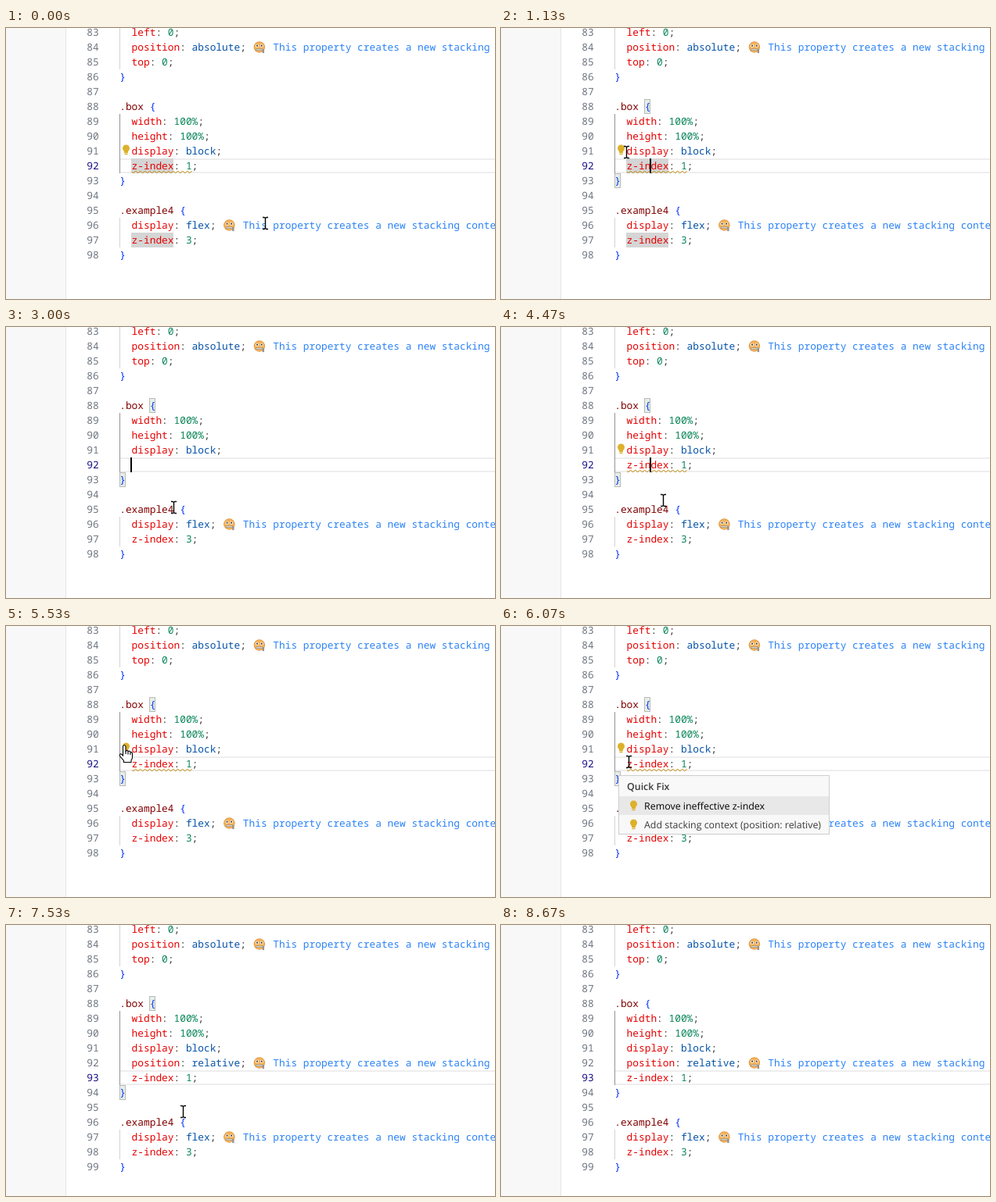
An HTML page with a canvas for the animation above (9140 ms loop, 625 by 347 pixels).

```html
<!DOCTYPE html>
<html lang="en">
<head>
<meta charset="utf-8">
<title>Quick fix in a code editor</title>
<style>
  html, body { margin: 0; width: 100%; height: 100%; overflow: hidden; background: #fff; }
  canvas { display: block; }
</style>
</head>
<body>
<canvas id="stage" width="625" height="347"></canvas>
<script>
const ctx = document.getElementById('stage').getContext('2d');
ctx.textRendering = 'geometricPrecision';

const LOOP = 9140, STEP = 200 / 3;
const LEFT = 145.2, CHAR = 7.698, LINE = 19, FIRST = 83;
const CODE_FONT = '12.83px "Noto Sans Mono", monospace';
const MENU_FONT = '12.41px "Open Sans", sans-serif';
const NOTE = 'This property creates a new stacking context';
const BRACE = '#0431fa';

const col = c => LEFT + c * CHAR;
const lineTop = n => (n - FIRST) * LINE - 4;
const within = (t, from, to) => t >= from && t < to;

function rect(x, y, w, h, color) {
  ctx.fillStyle = color;
  ctx.fillRect(x, y, w, h);
}

function text(str, x, y, color, font = CODE_FONT) {
  ctx.font = font;
  ctx.fillStyle = color;
  ctx.fillText(str, x, y);
}

function disc(x, y, r, color) {
  ctx.fillStyle = color;
  ctx.beginPath();
  ctx.arc(x, y, r, 0, 7);
  ctx.fill();
}

// ---- Code ----

function codeLine(src, n) {
  const y = lineTop(n) + 14;
  let c = 0;
  const put = (str, color) => { text(str, col(c), y, color); c += str.length; };
  const rule = src.match(/^([\w-]+): (.+);$/);
  if (rule) {
    c = 2;
    put(rule[1], '#e50000');
    put(': ', '#3b3b3b');
    put(rule[2], /^\d/.test(rule[2]) ? '#098658' : '#0451a5');
    put(';', '#3b3b3b');
  } else if (src.startsWith('.')) {
    put(src.slice(0, -1), '#800000');
    put('{', BRACE);
  } else {
    put(src, BRACE);
  }
}

function zipFace(x, y) {
  disc(x, y, 7.2, '#dc8f3c');
  disc(x, y, 6.5, '#f6b255');
  for (const side of [-1, 1]) {
    disc(x + side * 2.8, y - 1.8, 2, '#fff');
    disc(x + side * 2.8, y - 1.8, 1.1, '#4a3a30');
  }
  rect(x - 4.5, y + 2, 9, 2.4, '#8c8580');
  rect(x - 4, y + 2.6, 8, 1.2, '#e2ddd6');
  rect(x + 3.8, y + 2.6, 2.4, 5, '#9a938d');
}

function note(n, afterCol) {
  const x = col(afterCol), y = lineTop(n);
  zipFace(x + 17, y + 9.5);
  text(NOTE, x + 34.5, y + 14, '#2b82f5');
}

function guide(from, to, color) {
  rect(145, lineTop(from), 1, (to - from + 1) * LINE, color);
}

function bracketBox(c, n) {
  const x = Math.floor(col(c)), y = lineTop(n);
  rect(x, y, 8, LINE, '#e5efe5');
  ctx.strokeStyle = '#b9b9b9';
  ctx.lineWidth = 1;
  ctx.strokeRect(x + 0.5, y + 0.5, 7, LINE - 1);
}

function squiggle(n) {
  const y = lineTop(n) + 17.5;
  ctx.strokeStyle = '#bf8803';
  ctx.lineWidth = 1;
  ctx.beginPath();
  ctx.moveTo(161, y);
  for (let x = 162.7, dy = 1.2; x <= 238; x += 3, dy = -dy) ctx.lineTo(x, y + dy);
  ctx.stroke();
}

function bulb(x, y) {
  disc(x, y - 2, 4.5, '#ddb12b');
  rect(x - 2.5, y + 1, 5, 3, '#ddb12b');
  rect(x - 2, y + 4.6, 4, 1.6, '#ddb12b');
}

// ---- Quick fix menu ----

function menu(x, selected) {
  rect(x, 191, 270, 76, '#cecece');
  rect(x + 1, 192, 268, 74, '#f8f8f8');
  text('Quick Fix', x + 11, 210, '#3b3b3b', '600 ' + MENU_FONT);
  ['Remove ineffective z-index', 'Add stacking context (position: relative)'].forEach((label, i) => {
    const y = 218 + i * 24, on = i === selected;
    if (on) rect(x + 1, y, 268, 24, '#e8e8e8');
    bulb(x + 19.5, y + 12);
    text(label, x + 33, y + 17, on ? '#000' : '#3b3b3b', MENU_FONT);
  });
}

// ---- Mouse ----

const MOVES = [ // start, end, x, y
  [0, 530, 194, 175],
  [670, 1270, 154, 156],
  [1930, 2600, 214, 231],
  [4270, 5200, 154, 158],
  [5200, 5530, 150, 153],
  [5870, 6530, 211, 250],
  [7200, 7530, 226, 239],
  [7930, 8270, 108, 336],
];

function mouseAt(t) {
  let x = 331, y = 250;
  for (const [start, end, toX, toY] of MOVES) {
    const p = Math.min(1, Math.max(0, (t - start) / (end - start)));
    const k = p * p * (3 - 2 * p);
    x += (toX - x) * k;
    y += (toY - y) * k;
  }
  return [Math.round(x), Math.round(y)];
}

const ARROW = new Path2D('M-1 1V17L2.7 13.5L5.2 19.2L7.7 18.1L5.3 12.5H10.5Z');
const HAND = new Path2D('M-.5 1Q1 -2 3 1V7Q5 5.5 6 7.5Q8 6.5 9 8.5Q11.5 8 11.5 10.5V15' +
  'Q11.5 17.5 10 19V21.5H.5V19.5L-4.5 13.5Q-5 10 -2.5 11L-.5 13Z');
const KNUCKLES = new Path2D('M3 7V11M6 8V11.5M9 9V12');
const IBEAM = new Path2D('M-3 -7.5H-1L.5 -6.5L2 -7.5H4M.5 -6.5V6.5M-3 7.5H-1L.5 6.5L2 7.5H4');

function pointer(kind, x, y) {
  ctx.save();
  ctx.translate(x, y);
  ctx.strokeStyle = '#000';
  ctx.fillStyle = '#fff';
  ctx.lineWidth = kind === 'ibeam' ? 1.4 : 1.1;
  if (kind === 'ibeam') {
    ctx.stroke(IBEAM);
  } else {
    const shape = kind === 'hand' ? HAND : ARROW;
    ctx.fill(shape);
    ctx.stroke(shape);
    if (kind === 'hand') ctx.stroke(KNUCKLES);
  }
  ctx.restore();
}

// ---- Scene ----

const CARET_ON = [[730, 1270], [3000, 3530], [4000, 4530], [5000, 5530], [6730, 7270], [7730, 8270]];

function draw(t) {
  const removed = within(t, 3000, 4000);
  const inserted = t >= 6730;
  const hinted = t < 3000 || within(t, 4330, 6730);
  const menuX = within(t, 1530, 3000) ? 154 : within(t, 5600, 6730) ? 150 : 0;
  const [mx, my] = mouseAt(t);

  const lines = ['left: 0;', 'position: absolute;', 'top: 0;', '}', '',
    '.box {', 'width: 100%;', 'height: 100%;', 'display: block;',
    ...(inserted ? ['position: relative;'] : []),
    removed ? '' : 'z-index: 1;', '}', '',
    '.example4 {', 'display: flex;', 'z-index: 3;', '}'];
  const current = inserted ? 93 : 92;

  rect(0, 0, 625, 347, '#fff');
  rect(0, 0, 76, 347, '#f8f8f8');
  rect(76, 0, 1, 347, '#e5e5e5');

  rect(146, lineTop(current), 479, 2, '#eee');
  rect(146, lineTop(current) + LINE - 2, 479, 2, '#eee');
  if (t < 3000) for (const n of [92, 97]) rect(160, lineTop(n), 54, LINE, '#d5d5d5');
  if (within(t, 730, 8670)) {
    bracketBox(5, 88);
    bracketBox(0, current + 1);
  }
  guide(83, 85, '#d3d3d3');
  guide(89, current, '#939393');
  guide(current + 4, current + 5, '#d3d3d3');

  lines.forEach((src, i) => {
    const n = FIRST + i;
    text(n, 103.3, lineTop(n) + 14, n === current ? '#171184' : '#6e7681');
    if (src) codeLine(src, n);
  });
  note(84, 21);
  note(current + 4, 16);
  if (t >= 7070) note(92, 21);

  if (hinted) {
    squiggle(92);
    bulb(153.5, 156);
  }
  if (CARET_ON.some(([on, off]) => within(t, on, off))) {
    rect(removed ? 159 : 190, lineTop(current), 2, LINE, '#000');
  }
  if (menuX) menu(menuX, menuX === 150 && my >= 242 ? 1 : 0);

  if (t < 8270) {
    const overBulb = hinted && Math.abs(mx - 153) < 6 && Math.abs(my - 156) < 8;
    const kind = menuX
      ? (my >= 218 && mx > menuX ? 'hand' : my >= 191 || mx < 160 ? 'arrow' : 'ibeam')
      : overBulb ? 'hand' : 'ibeam';
    pointer(kind, mx, my);
  }
}

// The picture advances at 15 steps per second.
function frame() {
  const step = Math.floor((performance.now() % LOOP + 5) / STEP);
  draw(Math.round(step * STEP / 10) * 10);
  requestAnimationFrame(frame);
}
frame();
</script>
</body>
</html>
```
